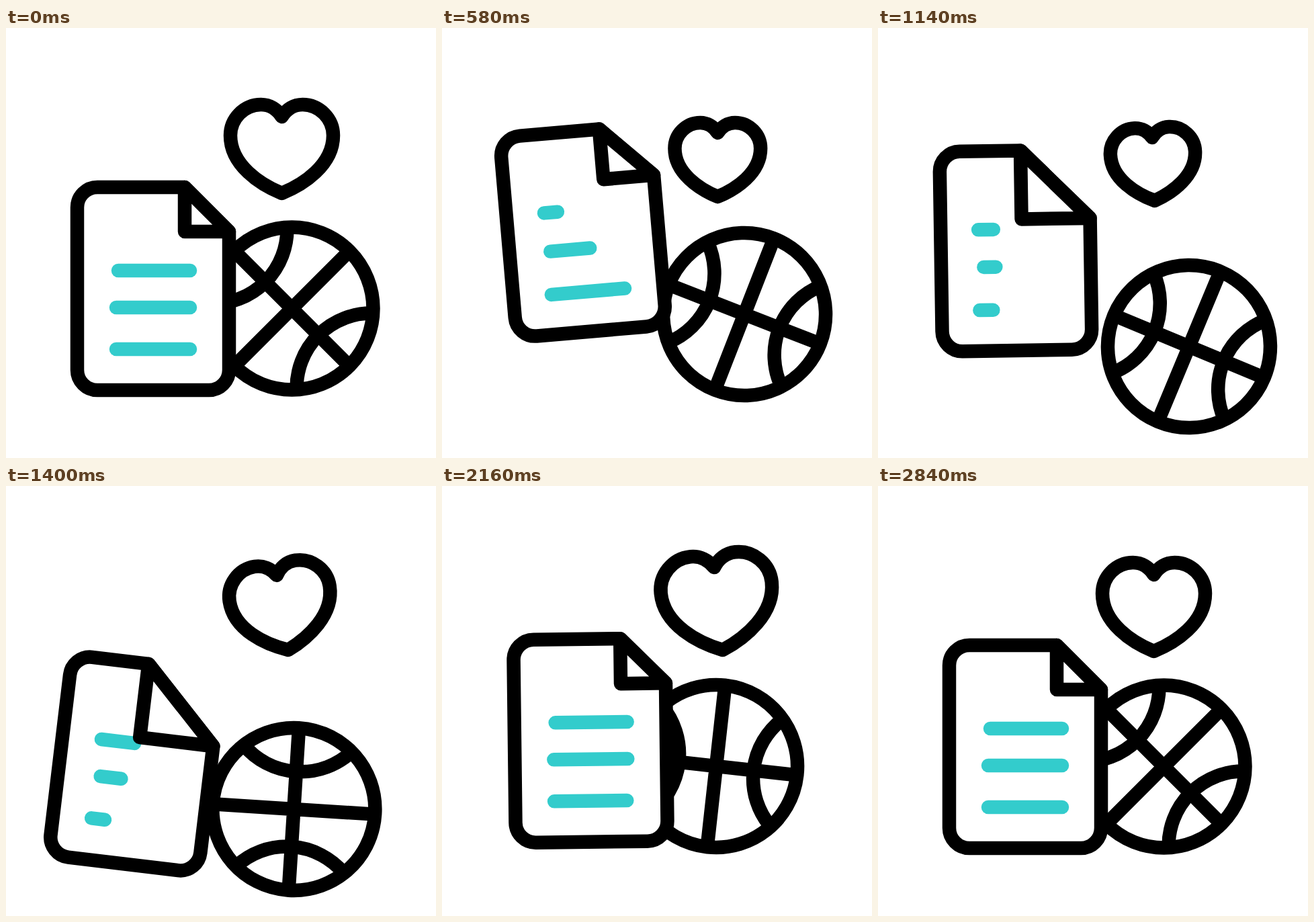
An HTML page for the animation above (3.2 s loop, 640x640 px).

```html
<!DOCTYPE html>
<html lang="en">
<head>
<meta charset="utf-8">
<title>Document, ball and heart</title>
<style>
  html, body { margin: 0; width: 100%; height: 100%; overflow: hidden; background: #fff; }
  svg { display: block; width: 100vw; height: 100vh; }
  .ink { fill: none; stroke: #000; stroke-width: 20.5; stroke-linejoin: round; }
  .paper { fill: #fff; }
  #lines { fill: none; stroke: #3cc; stroke-width: 20.5; stroke-linecap: round; }
  #heart path { vector-effect: non-scaling-stroke; }
</style>
</head>
<body>
<svg viewBox="0 0 640 640">
  <g id="ball" class="ink">
    <circle r="121"/>
    <path id="seams"/>
  </g>
  <g id="doc">
    <path id="page" class="ink paper"/>
    <g id="lines"><path/><path/><path/></g>
    <path id="fold" class="ink paper"/>
  </g>
  <g id="heart" class="ink">
    <path d="M0-57C7-68 18-75 31-75C56-75 76.5-54 76.5-29C76.5 15 32 44 0 57C-32 44-76.5 15-76.5-29C-76.5-54-56-75-31-75C-18-75-7-68 0-57Z"/>
  </g>
</svg>
<script>
const LOOP = 3200;
const $ = id => document.getElementById(id);
const mix = (a, b, k) => a + (b - a) * k;

// Smooth curve through rows of [time, ...values]; it never overshoots a knot.
function track(rows, endSlope = 0) {
  const last = rows.length - 1;
  const slope = (i, c) => (rows[i + 1][c] - rows[i][c]) / (rows[i + 1][0] - rows[i][0]);
  const tangent = (i, c) => {
    if (i === 0) return endSlope * slope(0, c);
    if (i === last) return endSlope * slope(last - 1, c);
    const a = slope(i - 1, c), b = slope(i, c);
    return a * b > 0 ? 2 * a * b / (a + b) : 0;
  };
  return t => {
    if (t <= rows[0][0]) return rows[0].slice(1);
    if (t >= rows[last][0]) return rows[last].slice(1);
    const i = rows.findIndex(r => r[0] > t) - 1;
    const p = rows[i], q = rows[i + 1], h = q[0] - p[0], u = (t - p[0]) / h;
    return p.slice(1).map((v, n) => {
      const c = n + 1, w = 1 - u;
      return v * (1 + 2 * u) * w * w + q[c] * u * u * (3 - 2 * u)
        + h * u * w * (w * tangent(i, c) - u * tangent(i + 1, c));
    });
  };
}

// x, y, turn
const ballAt = track([
  [60, 425.5, 417.5, 0],
  [580, 450, 426, 156],
  [860, 470, 452, 247],
  [1140, 463, 474, 337.3],
  [1300, 443, 484, 379],
  [1400, 428.5, 481, 408.3],
  [1700, 394, 458, 529],
  [1780, 391, 449, 557],
  [2160, 408, 417, 681],
  [2220, 412, 417, 702],
  [2760, 425.5, 417.5, 900]
], 1);

// x, y, turn, scale, fold
const docAt = track([
  [60, 219, 388, 0, 1, 66],
  [580, 210, 302.7, -4.9, .99, 75],
  [850, 188, 260, -8, .985, 90],
  [1140, 205, 331, -.9, .985, 102],
  [1400, 192.3, 413.3, 6.8, .993, 110],
  [1450, 186, 421, 8.5, .995, 112],
  [1700, 217.6, 328.8, -2, 1.01, 118],
  [1880, 212, 280, -4.5, 1.01, 102],
  [2160, 221, 378.6, -.7, 1, 67],
  [2360, 219.5, 389.5, .1, 1, 66],
  [2760, 219, 388, 0, 1, 66]
]);

// x, y, turn, scale
const heartAt = track([
  [60, 410.5, 189, 0, 1],
  [580, 410.3, 203.5, 0, .835],
  [880, 410, 213, -.3, .77],
  [1140, 410, 210, -2.4, .825],
  [1400, 411.5, 188.5, -8.7, .985],
  [1700, 414.5, 161.5, -16.8, 1.18],
  [1860, 416, 147, -20, 1.25],
  [2160, 411.5, 182.5, -6, 1.085],
  [2220, 411, 187, -3, 1.05],
  [2840, 410.5, 189, 0, 1]
]);

// Text lines: [x, y, length] when open and shut, and how open over time.
const lines = [
  { open: [-52, -27, 107], shut: [-55.5, -32, 20],
    at: track([[60, 1], [560, 0], [1080, 0], [1140, .03], [1400, .34], [1700, .83], [1900, 1]]) },
  { open: [-55, 28, 110], shut: [-48, 24, 18],
    at: track([[250, 1], [580, .45], [860, 0], [1250, 0], [1400, .14], [1700, .945], [1780, 1]]) },
  { open: [-55, 90, 110], shut: [-55, 88, 20],
    at: track([[560, 1], [1060, 0], [1540, 0], [1700, .14], [2160, .98], [2240, 1]]) }
];

function seamPath(R, reach, r) {
  const a = Math.acos((R * R + reach * reach - r * r) / (2 * R * reach));
  const point = angle => `${R * Math.cos(angle)} ${R * Math.sin(angle)}`;
  const arc = axis => `M${point(axis - a)}A${r} ${r} 0 0 0 ${point(axis + a)}`;
  const bar = axis => `M${point(axis)}L${point(axis + Math.PI)}`;
  const q = Math.PI / 4;
  return bar(q) + bar(3 * q) + arc(q) + arc(5 * q);
}

function place(el, x, y, turn, scale = 1) {
  el.setAttribute('transform', `translate(${x} ${y}) rotate(${turn}) scale(${scale})`);
}

function drawDoc(t) {
  const [x, y, turn, scale, fold] = docAt(t);
  const w = 113 * scale, h = 151 * scale, r = 30, fx = w - fold, fy = fold - h;
  place($('doc'), x, y, turn);
  $('page').setAttribute('d', `M${fx} ${-h}L${w} ${fy}V${h - r}A${r} ${r} 0 0 1 ${w - r} ${h}`
    + `H${r - w}A${r} ${r} 0 0 1 ${-w} ${h - r}V${r - h}A${r} ${r} 0 0 1 ${r - w} ${-h}Z`);
  $('fold').setAttribute('d', `M${fx} ${-h}V${fy}H${w}Z`);
  lines.forEach(({ open, shut, at }, i) => {
    const [k] = at(t);
    const [lx, ly, len] = open.map((v, n) => mix(shut[n], v, k));
    $('lines').children[i].setAttribute('d', `M${lx} ${ly}h${len}`);
  });
}

function frame(now) {
  const t = now % LOOP;
  place($('ball'), ...ballAt(t));
  place($('heart'), ...heartAt(t));
  drawDoc(t);
  requestAnimationFrame(() => frame(performance.now() - start));
}

$('seams').setAttribute('d', seamPath(121, 167, 111));
const start = performance.now();
frame(0);
</script>
</body>
</html>
```
